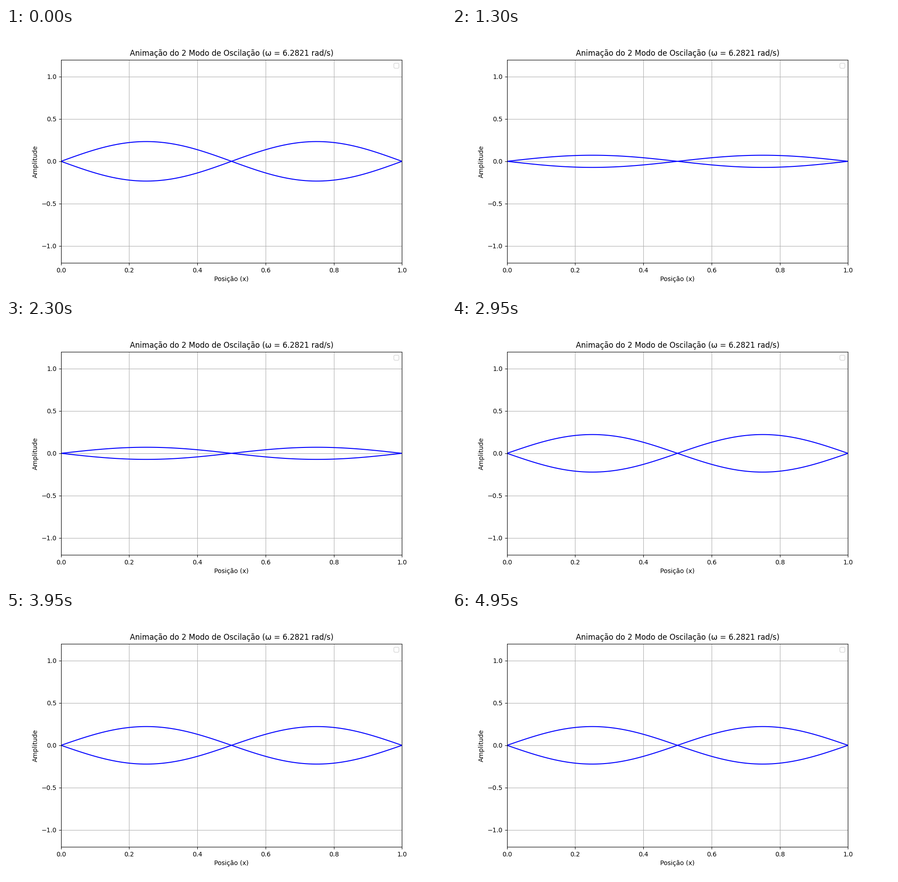
Recreate the animation shown at these times as a matplotlib script. Size 966 px wide and 580 px high, loop 5 s.

```python
import numpy as np
import matplotlib.pyplot as plt
from matplotlib.animation import FuncAnimation

WIDTH, HEIGHT, DPI = 966, 580, 100
FRAMES, INTERVAL = 100, 50
MODE = 2
OMEGA = 6.2821
PEAK = 0.2333

plt.rcParams["font.family"] = "DejaVu Sans"

x = np.linspace(0, 1, 100)
shape = PEAK * np.sin(MODE * np.pi * x)

fig, ax = plt.subplots(figsize=(WIDTH / DPI, HEIGHT / DPI), dpi=DPI)
upper, = ax.plot(x, shape, color="blue", lw=1.5)
lower, = ax.plot(x, -shape, color="blue", lw=1.5)

ax.set_xlim(0, 1)
ax.set_ylim(-1.2, 1.2)
ax.set_xlabel("Posição (x)")
ax.set_ylabel("Amplitude")
ax.set_title(f"Animação do {MODE} Modo de Oscilação (ω = {OMEGA} rad/s)")
ax.grid(True)
ax.legend([], [], loc="upper right")


def update(frame):
    # The two strings swing in opposite phase.
    y = shape * np.cos(OMEGA * frame * INTERVAL / 1000)
    upper.set_ydata(y)
    lower.set_ydata(-y)
    return upper, lower


anim = FuncAnimation(fig, update, frames=FRAMES, interval=INTERVAL,
                     repeat=True, repeat_delay=0)
plt.show()
```
